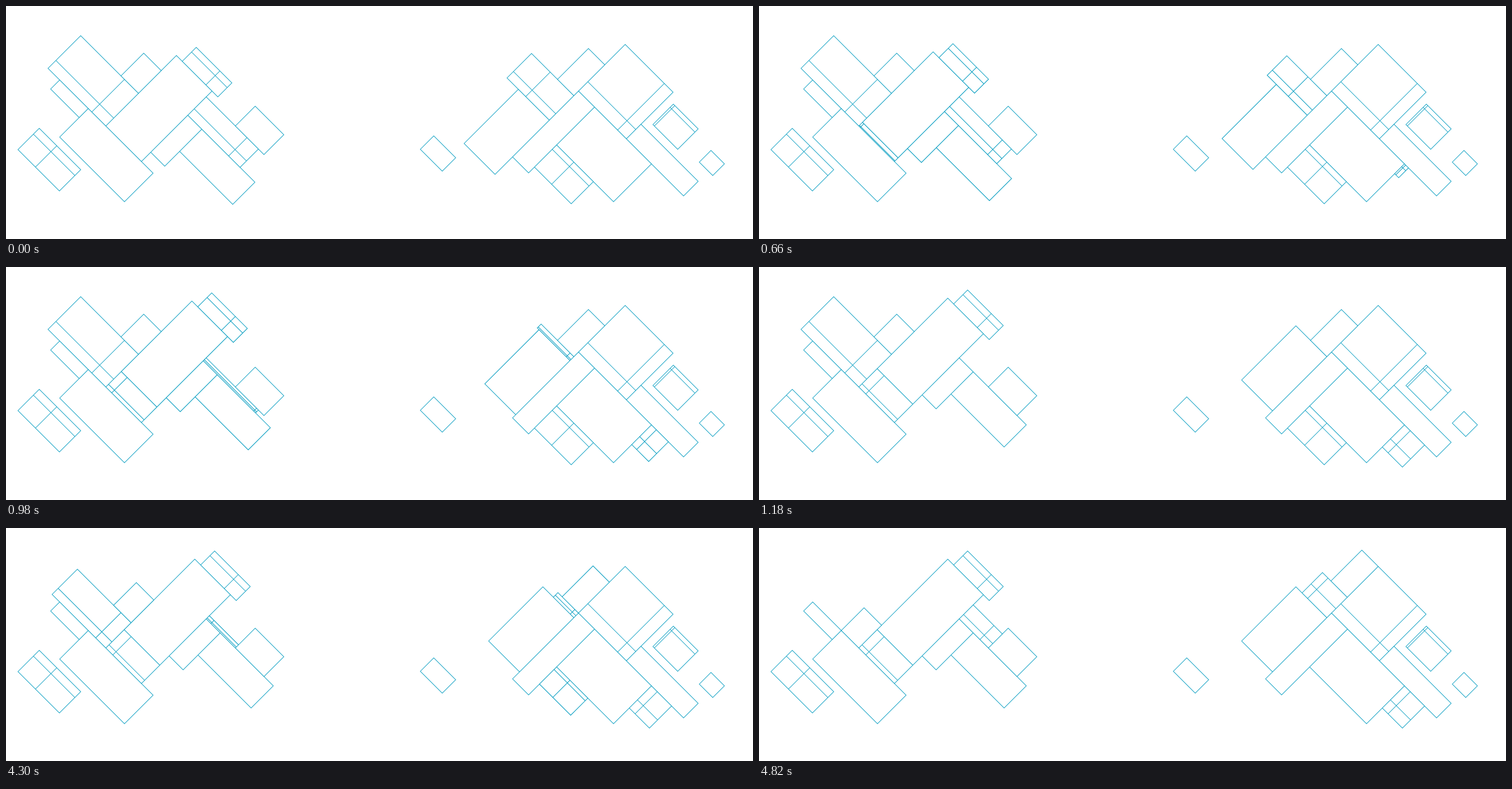
An HTML page with a canvas for the animation above (8 s loop, 1280x400 px).

```html
<!DOCTYPE html>
<html lang="en">
<head>
<meta charset="utf-8">
<title>Sliding rectangles</title>
<style>
  html, body { margin: 0; height: 100%; overflow: hidden; background: #fff; }
  canvas { display: block; }
</style>
</head>
<body>
<canvas id="stage" width="1280" height="400"></canvas>
<script>
const LOOP = 8000, SLIDE = 720;
const ctx = document.getElementById('stage').getContext('2d');

// Eased progress (0 to 1) of a slide that begins at `start`.
function slide(time, start) {
  const t = Math.min(1, Math.max(0, (time - start) / SLIDE));
  return 0.5 - Math.cos(Math.PI * t) / 2;
}

// Diamond-turned rectangle: (x, y) is its left corner,
// a runs down-right and b runs up-right, both measured along x.
function box(x, y, a, b) {
  ctx.moveTo(x, y);
  ctx.lineTo(x + b, y - b);
  ctx.lineTo(x + a + b, y + a - b);
  ctx.lineTo(x + a, y + a);
  ctx.closePath();
}

// Box with two inner lines, at u along a and at v along b.
function crossBox(x, y, a, b, u, v) {
  if (Math.min(a, b) < 0.2) return;
  box(x, y, a, b);
  ctx.moveTo(x + u, y + u);
  ctx.lineTo(x + u + b, y + u - b);
  ctx.moveTo(x + v, y - v);
  ctx.lineTo(x + v + a, y - v + a);
}

function drawLeft(p, r) {
  const q = 1 - p, s = 1 - r;

  crossBox(20.5, 246.5, 71, 36.5, 30, 26.5);
  box(76.5, 142.5, 49, 15.5);
  box(92, 225, 111, 49);
  box(393, 206, 49, 34);

  // Group pushed up-right by the first slide
  const d = 31.5 * p, gap = 31.5 * q;
  box(171 + d, 206 - d, 61, 121);
  crossBox(302 + d, 95 - d, 61, 24, 40.5, 16);
  box(248 + d, 251 - d, 24, 63.5);
  box(297.5 + d, 249.5 - d, 91, 38);
  crossBox(171, 206, 61, d, 12 * p, 5.5 * p);
  crossBox(343 - gap, 156 + gap, 89.5, gap, 89.5 - 19.5 * q, 11 * q);

  // Second slide
  const a = 68 + 31 * s, b = 56 * s;
  crossBox(171 - a, 206 - a, a, b, a - 24 * s * a / 99, 13.5 * s);
  box(141 + b, 176 - b, 30, 39);
  crossBox(343, 156, 50, 24 * r, 35.5 * r, 7.5 * r);
}

function drawRight(p, r) {
  const q = 1 - p, s = 1 - r;
  let a, b;

  box(710, 246, 37.5, 23);
  box(1188, 268, 23, 20);
  crossBox(1108.5, 203.5, 42.5, 35, 2.5, 29.5);
  crossBox(981, 146, 82, 80, 67, 16);
  box(868, 259, 27.5, 113);
  box(943.5, 238.5, 97.5, 65);
  box(1063, 228, 98, 25);

  // First slide
  const d = 42 * p;
  box(785 + d, 236 - d, 53, 93);
  a = 53 + 19.5 * q;
  b = 42 * q;
  crossBox(973 - a - b, 154 - a + b, a, b, a - 40.5 * q, 11 * q);
  a = 34.5 * p;
  b = 11.5 + 26.5 * p;
  crossBox(1106 - b, 271 + b, a, b, 10 * p, b - 24 * p);

  // Second slide
  const e = 35 * r;
  box(945 + e, 126 - e, 28, 53);
  a = 33 + 9.5 * r;
  crossBox(973 - a, 154 - a, a, e, a - 33 * r * a / 42.5, 15.5 * r);
  a = 21 + 42 * s;
  b = 38 * s;
  crossBox(943.5 - b, 238.5 + b, a, b, 29.5 * s, b - 7.5 * s * s);
}

function frame(now) {
  const time = now % LOOP;
  const first = slide(time, 448), second = slide(time, 4074);
  ctx.fillStyle = '#fff';
  ctx.fillRect(0, 0, 1280, 400);
  ctx.strokeStyle = '#0c9fc2';
  ctx.lineWidth = 1.05;
  ctx.beginPath();
  drawLeft(first, second);
  drawRight(first, second);
  ctx.stroke();
  requestAnimationFrame(frame);
}

requestAnimationFrame(frame);
</script>
</body>
</html>
```
